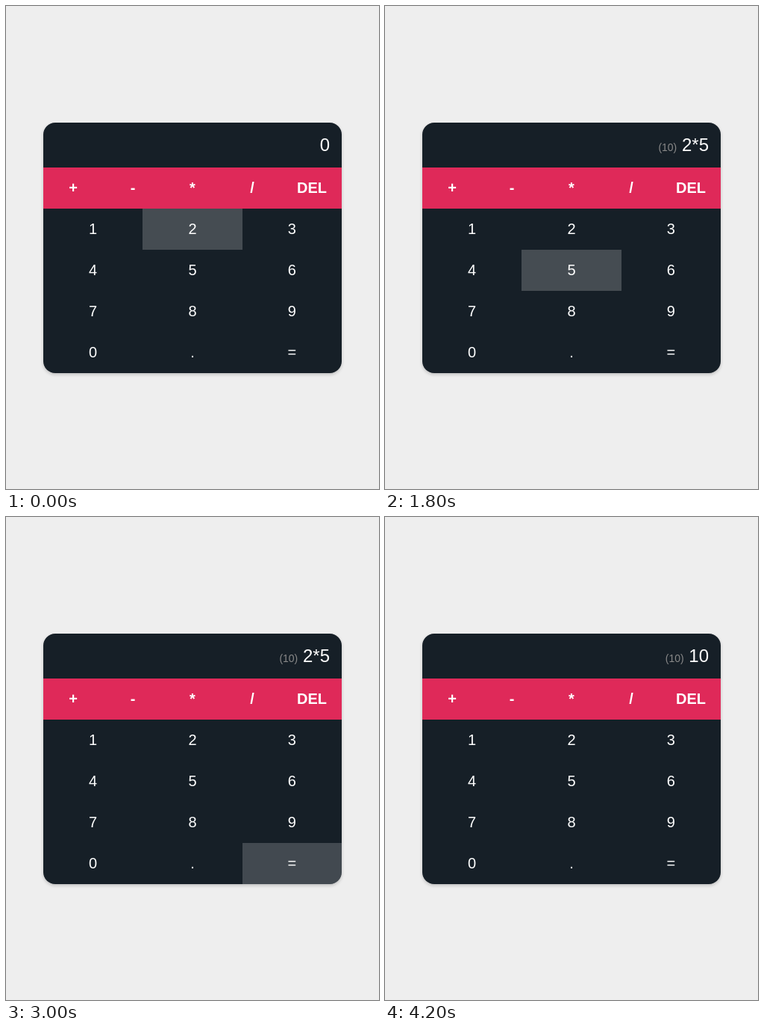
An HTML page for the animation above (5.39 s loop, 500x646 px).

```html
<!DOCTYPE html>
<html lang="en">
<head>
<meta charset="utf-8">
<title>Calculator</title>
<style>
  html, body { margin: 0; width: 100%; height: 100%; overflow: hidden; background: #eee; }
  .calculator {
    position: absolute; left: 50px; top: 156px; width: 400px; height: 335px;
    border-radius: 16px; overflow: hidden; background: #161f27;
    box-shadow: 0 2px 4px rgba(0, 0, 0, .2);
    color: #fff; font: 20px/23px "Liberation Sans", Arial, sans-serif; text-align: center;
  }
  .display { height: 28px; padding: 16px; font-size: 24px; line-height: 28px; text-align: right; }
  .preview { font-size: 14px; color: #888; }
  .operators { display: grid; grid-template-columns: repeat(5, 1fr); background: #df2959; font-weight: bold; }
  .digits { display: grid; grid-template-columns: repeat(3, 1fr); }
  .key { padding: 16px 0; }
</style>
</head>
<body>
<div class="calculator">
  <div class="display"><span class="preview"></span> <span class="entry">0</span></div>
  <div class="operators"></div>
  <div class="digits"></div>
</div>
<script>
const LOOP = 5390, TICK = 200 / 3, FADE = 250, HIGHLIGHT = 0.2;

// Pointer visits: key, time entered, time left.
const visits = [
  ['2', -1000, 805], ['*', 805, 1195],
  ['2', 1195, 1295], ['5', 1295, 2467],
  ['2', 2467, 2512], ['3', 2508, 2545],
  ['6', 2701, 2779], ['9', 2779, 2830], ['=', 2830, 3403],
  ['9', 3403, 3485], ['6', 3497, 3545], ['3', 3545, 3600], ['DEL', 3600, 3670]
];

// Display contents: time, preview, entry.
const readouts = [
  [0, '', '0'], [530, '(2)', '2'], [1065, '(2)', '2*'],
  [1665, '(10)', '2*5'], [3065, '(10)', '10']
];

const find = selector => document.querySelector(selector);
const keys = {};

function addKeys(parent, labels) {
  for (const label of labels) {
    const key = document.createElement('div');
    key.className = 'key';
    key.textContent = label;
    parent.append(key);
    keys[label] = key;
  }
}

// The CSS "ease" curve, solved by bisection.
function ease(x) {
  if (x <= 0) return 0;
  if (x >= 1) return 1;
  let low = 0, high = 1, s = 0.5;
  for (let i = 0; i < 20; i++) {
    s = (low + high) / 2;
    if (0.75 * s * (1 - s) + s ** 3 < x) low = s; else high = s;
  }
  return 0.3 * s * (1 - s) ** 2 + 3 * s * s * (1 - s) + s ** 3;
}

function glow(time, enter, leave) {
  if (time < leave) return ease((time - enter) / FADE);
  const peak = ease((leave - enter) / FADE);
  return peak * (1 - ease((time - leave) / (FADE * peak)));
}

function render(time) {
  const levels = {};
  for (const [label, enter, leave] of visits) {
    levels[label] = Math.max(levels[label] || 0, glow(time, enter, leave));
  }
  for (const label in levels) {
    keys[label].style.backgroundColor = `rgba(255, 255, 255, ${(HIGHLIGHT * levels[label]).toFixed(4)})`;
  }
  const [, preview, entry] = readouts.filter(([start]) => time >= start).pop();
  find('.preview').textContent = preview;
  find('.entry').textContent = entry;
}

function frame() {
  const time = performance.now() % LOOP;
  render(Math.floor((time + 4) / TICK) * TICK);
  requestAnimationFrame(frame);
}

addKeys(find('.operators'), ['+', '-', '*', '/', 'DEL']);
addKeys(find('.digits'), [...'123456789', '0', '.', '=']);
frame();
</script>
</body>
</html>
```
